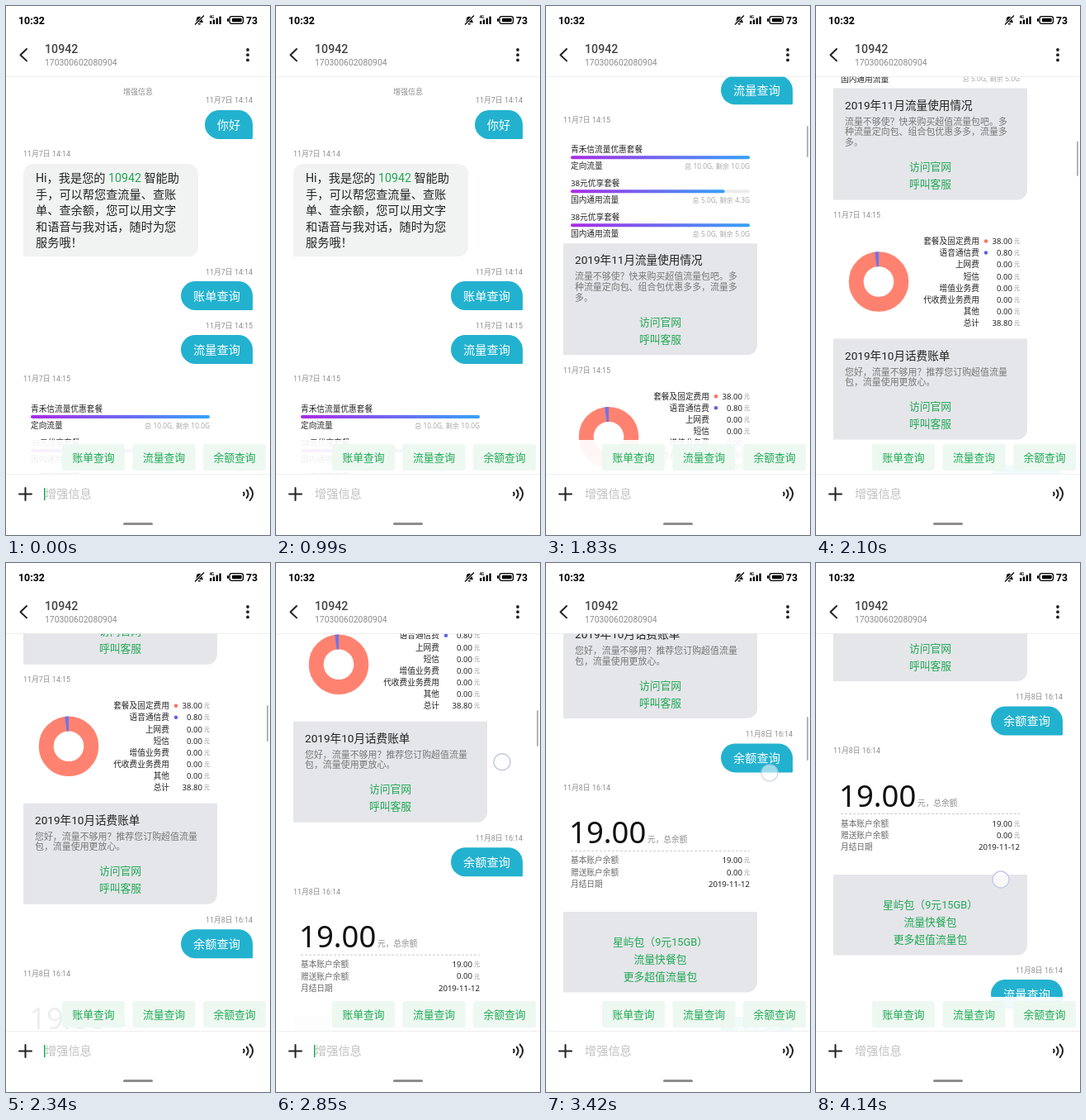
An HTML page that plays this animation: 320x640 px, repeating every 4170 ms.

```html
<!DOCTYPE html>
<html lang="zh-CN">
<head>
<meta charset="utf-8">
<style>
html, body { margin: 0; width: 100%; height: 100%; overflow: hidden; background: #fff; }
svg { display: block; width: 320px; height: 640px; }
text { font-family: Roboto, 'Noto Sans CJK SC', 'Noto Sans CJK', sans-serif; }
.card { font-family: 'Noto Sans', 'Noto Sans CJK SC', 'Noto Sans CJK', sans-serif; }
.line { fill: none; stroke: #222; stroke-width: 2; stroke-linecap: round; stroke-linejoin: round; }
</style>
</head>
<body>
<svg viewBox="0 0 320 640">
  <defs>
    <clipPath id="view"><rect y="85" width="320" height="481"/></clipPath>
    <linearGradient id="usage"><stop stop-color="#a92ce6"/><stop offset="1" stop-color="#35a2f8"/></linearGradient>
  </defs>
  <g clip-path="url(#view)"><g id="chat"></g></g>
  <g id="chrome"></g>
  <rect id="cursor" x="46" y="583" width="1.5" height="15" fill="#1fa853"/>
  <rect id="bar" x="316" width="2" rx="1" fill="#b4b4b4"/>
  <circle id="touch" r="10" fill="#fff" fill-opacity=".72" stroke="#c6c9e4" stroke-width="1.4"/>
</svg>
<script>
const $ = id => document.getElementById(id);
const GREEN = '#1fa853', GREY = '#8c8c8c', DARK = '#222';

// cy is the optical middle of the line
const text = (x, cy, str, size, fill = DARK, anchor = 'start', extra = '') =>
  `<text x="${x}" y="${cy + size * .37}" font-size="${size}" fill="${fill}" text-anchor="${anchor}" ${extra}>${str}</text>`;
const label = (x, cy, str, fill, anchor, size = 9.7) => text(x, cy, str, size, fill, anchor, 'class="card"');
const rect = (x, y, w, h, fill, r = 0) =>
  `<rect x="${x}" y="${y}" width="${w}" height="${h}" rx="${r}" fill="${fill}"/>`;
const stamp = (cy, str, right) => text(right ? 299 : 21, cy, str, 8.9, GREY, right ? 'end' : 'start');

function sent(y, str) {
  const x = str.length > 2 ? 212 : 241;
  return `<path d="M${x + 17.5} ${y}H281.5a17.5 17.5 0 0 1 17.5 17.5V${y + 34}q0 1-1 1H${x + 17.5}a17.5 17.5 0 0 1 0-35z" fill="#22b2cf"/>`
    + text((x + 299) / 2, y + 17.5, str, 14.2, '#fff', 'middle');
}

const panel = (y, h) => `<path d="M21 ${y}H256V${y + h - 12}a12 12 0 0 1-12 12H21z" fill="#e5e6ea"/>`;
const links = (y, step, ...names) =>
  names.map((n, i) => text(138.5, y + i * step, n, 12.8, GREEN, 'middle')).join('');

function plan(y, name, kind, total, left) {
  return label(30, y, name) + rect(30, y + 8, 217, 4, '#ececee', 2)
    + rect(30, y + 8, 217 * left / total, 4, 'url(#usage)', 2)
    + label(30, y + 20.5, kind)
    + label(247, y + 20.5, `总 ${total.toFixed(1)}G, 剩余 ${left.toFixed(1)}G`, '#aaa', 'end', 8.35);
}

const money = (y, value) => label(238, y, value, DARK, 'end', 9.6) + label(247, y, '元', GREY, 'end', 7);

function bill() {
  const ring = (color, dash) => `<circle cx="76" cy="835" r="27.3" fill="none" stroke="${color}" stroke-width="18"
    pathLength="100" transform="rotate(-90 76 835)" ${dash}/>`;
  const rows = [['套餐及固定费用', '38.00'], ['语音通信费', '0.80'], ['上网费', '0.00'], ['短信', '0.00'],
    ['增值业务费', '0.00'], ['代收费业务费用', '0.00'], ['其他', '0.00'], ['总计', '38.80']];
  return ring('#ff8270', '') + ring('#6f74ea', 'stroke-dasharray="2.1 97.9" stroke-dashoffset="-97.9"')
    + rows.map(([name, value], i) => label(198, 786 + i * 14.15, name, DARK, 'end') + money(786 + i * 14.15, value)).join('')
    + '<circle cx="206" cy="786" r="2.2" fill="#ff705c"/><circle cx="206" cy="800" r="2.2" fill="#5a62e4"/>';
}

const welcome = [`Hi，我是您的 <tspan fill="${GREEN}">10942</tspan> 智能助`, '手，可以帮您查流量、查账',
  '单、查余额，您可以用文字', '和语音与我对话，随时为您', '服务哦！'];

$('chat').innerHTML = [
  text(160, 104, '增强信息', 9, GREY, 'middle'),
  stamp(114, '11月7日 14:14', true), sent(126, '你好'),
  stamp(179, '11月7日 14:14'),
  '<path d="M33 191H221a12 12 0 0 1 12 12V291a12 12 0 0 1-12 12H21V203a12 12 0 0 1 12-12z" fill="#f1f3f2"/>',
  ...welcome.map((s, i) => text(36, 208 + i * 19.5, s, 14.2)),
  stamp(322, '11月7日 14:14', true), sent(333, '账单查询'),
  stamp(387, '11月7日 14:15', true), sent(398, '流量查询'),
  stamp(451, '11月7日 14:15'),
  plan(487, '青禾信流量优惠套餐', '定向流量', 10, 10),
  plan(528, '38元优享套餐', '国内通用流量', 5, 4.3),
  plan(569, '38元优享套餐', '国内通用流量', 5, 5),
  panel(601, 135), text(35, 621, '2019年11月流量使用情况', 13.6),
  ...['流量不够使？快来购买超值流量包吧。多', '种流量定向包、组合包优惠多多，流量多', '多。']
    .map((s, i) => text(35, 641 + i * 12.6, s, 10.95, '#777')),
  links(696, 21, '访问官网', '呼叫客服'),
  stamp(754, '11月7日 14:15'), bill(),
  panel(904, 122), text(35, 924, '2019年10月话费账单', 13.6),
  ...['您好，流量不够用？推荐您订购超值流量', '包，流量使用更放心。']
    .map((s, i) => text(35, 944 + i * 12.6, s, 10.95, '#777')),
  links(986, 21, '访问官网', '呼叫客服'),
  stamp(1045, '11月8日 16:14', true), sent(1056.5, '余额查询'),
  stamp(1110, '11月8日 16:14'),
  label(28, 1164, '19.00', '#111', 'start', 36.5), label(123, 1173, '元，总余额', GREY),
  '<path d="M30 1186.5H247" stroke="#ccc" stroke-dasharray="3 2"/>',
  ...['基本账户余额', '赠送账户余额', '月结日期'].map((s, i) => label(30, 1198 + i * 14.2, s, '#666')),
  money(1198, '19.00'), money(1212.2, '0.00'), label(247, 1226.4, '2019-11-12', DARK, 'end', 9.6),
  panel(1260, 97.5), links(1296, 21.2, '星屿包（9元15GB）', '流量快餐包', '更多超值流量包'),
  stamp(1376, '11月8日 16:14', true), sent(1387, '流量查询')
].join('');

$('chrome').innerHTML = [
  rect(0, 0, 320, 85, '#fff'), rect(0, 85, 320, .7, '#e8e8e8'),
  text(15, 17, '10:32', 12.4, '#000', 'start', 'font-weight="700"'),
  text(291, 17, '73', 12.2, '#000', 'start', 'font-weight="700"'),
  // muted bell
  '<path d="M229.5 20q1.5-1.5 1.5-4a3.3 3.3 0 0 1 6.6 0q0 2.500 1.500 4zM232.500 21h3.500a1.750 1.500 0 0 1-3.500 0z"/>',
  '<path d="M240 11.500L229 22.500" stroke="#fff" stroke-width="3"/><path d="M240 11.500L229 22.500" stroke="#000" stroke-width="1.300"/>',
  text(246.5, 13.5, '4G', 4.5, '#000', 'start', 'font-weight="700"'),
  ...[4, 5.5, 7.5, 9.5].map((h, i) => rect(247 + i * 3.8, 22 - h, 2.3, h, '#000', .6)),
  '<rect x="271" y="12.700" width="16.500" height="8.600" rx="2.500" fill="none" stroke="#000" stroke-width="1.300"/>',
  rect(274, 14.8, 11.7, 4.4, '#000', 1), rect(268, 15, 2, 4, '#000', 1),
  '<path class="line" d="M25 52l-7.500 7.200 7.500 7.200"/>',
  text(47, 51.5, '10942', 14.2, '#444', 'start', 'font-weight="500"'),
  text(47, 68, '170300602080904', 10.4, GREY),
  ...[53, 59.2, 65.4].map(y => `<circle cx="293" cy="${y}" r="1.9" fill="${DARK}"/>`),
  '<rect y="525" width="320" height="41" fill="#fff" opacity=".93"/>',
  ...['账单查询', '流量查询', '余额查询'].map((s, i) =>
    rect(68 + i * 85.5, 530, 76, 32, '#edf8f1', 3) + text(106 + i * 85.5, 546, s, 12.8, GREEN, 'middle')),
  rect(0, 566, 320, 74, '#fff'), rect(0, 566, 320, .7, '#e8e8e8'),
  '<path class="line" d="M16 590.500H31M23.500 583V598"/>',
  text(47, 590, '增强信息', 14.2, '#c2c2c2'),
  '<path class="line" d="M288 588.500q1.500 1.800 0 3.600M291.700 585.500q4 4.800 0 9.600M295.700 582.500q7 7.800 0 15.600"/>',
  rect(142, 625, 36, 3, '#8e8e8e', 1.5)
].join('');

const clamp = v => Math.max(0, Math.min(1, v));

// Monotone cubic curve through [x, y] points, held flat outside them
function curve(pts) {
  const n = pts.length - 1;
  const slope = i => (pts[i + 1][1] - pts[i][1]) / (pts[i + 1][0] - pts[i][0]);
  const tangent = i => {
    if (i === 0 || i === n) return 0;
    const a = slope(i - 1), b = slope(i);
    return a * b > 0 ? 2 * a * b / (a + b) : 0;
  };
  return x => {
    if (x <= pts[0][0]) return pts[0][1];
    if (x >= pts[n][0]) return pts[n][1];
    const i = pts.findIndex(p => p[0] > x) - 1;
    const [x0, y0] = pts[i], [x1, y1] = pts[i + 1];
    const w = x1 - x0, u = (x - x0) / w, v = 1 - u;
    return v * v * ((1 + 2 * u) * y0 + u * w * tangent(i)) + u * u * ((3 - 2 * u) * y1 - v * w * tangent(i + 1));
  };
}

const scroll = curve([[1260, 0], [1530, 42], [1830, 313], [2340, 613], [2600, 658], [2850, 712],
  [3150, 816], [3420, 838], [3660, 883]]);
const barTop = curve([[0, 88], [42, 95], [313, 145], [613, 172], [712, 178], [838, 186], [883, 189]]);
const barSize = curve([[0, 72], [42, 72], [313, 38], [613, 44], [712, 44], [838, 53], [883, 53]]);

// A finger drags the page: from, until, and its place at a given scroll
const touches = [
  [1140, 1680, s => [268, 301 - s]],
  [2640, 2940, s => [274, 953 - s]],
  [3375, 3690, s => [271 + (s - 838) * .29, 254 - (s - 838) * .93]],
  [4080, 4170, () => [224, 383]]
];

function draw() {
  const t = performance.now() % 4170, s = scroll(t);
  $('chat').setAttribute('transform', `translate(0 ${-s})`);
  $('cursor').style.opacity = (t + 75) % 1200 < 600 ? 1 : 0;
  $('bar').setAttribute('y', barTop(s));
  $('bar').setAttribute('height', barSize(s));
  $('bar').style.opacity = clamp((t - 1260) / 60) * clamp((4110 - t) / 120);
  const held = touches.find(([from, until]) => t >= from && t < until + 60);
  $('touch').style.opacity = held ? clamp((t - held[0]) / 60) * clamp((held[1] + 60 - t) / 60) : 0;
  if (held) {
    const [x, y] = held[2](s);
    $('touch').setAttribute('cx', x);
    $('touch').setAttribute('cy', y);
  }
  requestAnimationFrame(draw);
}
draw();
</script>
</body>
</html>
```
